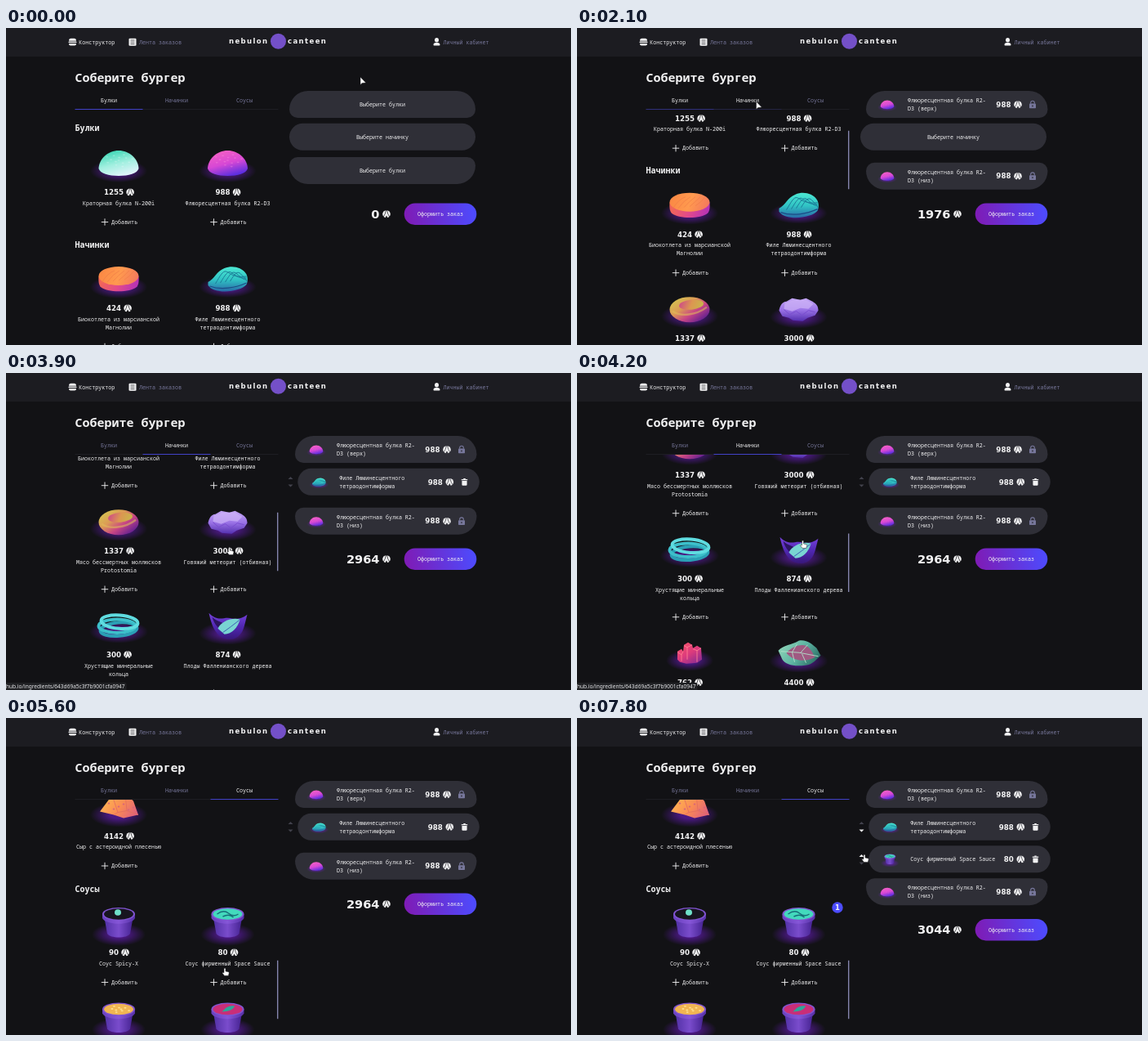
Write an HTML page with a canvas that moves like this. It is 692 px wide and 388 px high and loops after 8000 ms.

```html
<!DOCTYPE html>
<html lang="ru">
<head>
<meta charset="utf-8">
<title>Соберите бургер</title>
<style>
html, body { margin: 0; width: 100%; height: 100%; overflow: hidden; background: #121215; }
canvas { display: block; width: 692px; height: 388px; }
</style>
</head>
<body>
<canvas id="stage"></canvas>
<script>
const W = 692, H = 388, LOOP = 8000;
const canvas = document.getElementById('stage');
const ctx = canvas.getContext('2d');
const dpr = window.devicePixelRatio || 1;
canvas.width = W * dpr;
canvas.height = H * dpr;

const MONO = '"Noto Sans Mono", monospace';
const DIGITS = '"DejaVu Sans", sans-serif';
const WHITE = '#f2f2f3', MUTED = '#77779b', DIM = '#42424d', PANEL = '#2f2f37', ACCENT = '#4c4cff', BG = '#121215', BAR = '#1c1c21';

// ---------- drawing helpers ----------
function text(str, x, y, { size = 6.67, color = WHITE, align = 'left', font = MONO, weight = 400 } = {}) {
  ctx.font = `${weight} ${size}px ${font}`;
  ctx.fillStyle = color;
  ctx.textAlign = align;
  ctx.textBaseline = 'alphabetic';
  ctx.fillText(str, x, y + size * 0.35);
}
function digits(str, x, y, size = 8.7, align = 'left') {
  text(str, x, y, { size, align, font: DIGITS, weight: 700 });
}
function rect(x, y, w, h, color, radii = 0) {
  ctx.fillStyle = color;
  ctx.beginPath();
  ctx.roundRect(x, y, w, h, radii);
  ctx.fill();
}
function oval(x, y, rx, ry, color, turn = 0) {
  ctx.fillStyle = color;
  ctx.beginPath();
  ctx.ellipse(x, y, rx, ry, turn, 0, Math.PI * 2);
  ctx.fill();
}
function shape(d, fill, stroke, width = 1) {
  const p = new Path2D(d);
  if (fill) { ctx.fillStyle = fill; ctx.fill(p); }
  if (stroke) { ctx.strokeStyle = stroke; ctx.lineWidth = width; ctx.stroke(p); }
}
function fade(x0, y0, x1, y1, ...colors) {
  const g = ctx.createLinearGradient(x0, y0, x1, y1);
  colors.forEach((c, i) => g.addColorStop(i / (colors.length - 1), c));
  return g;
}
function at(x, y, draw, scale = 1) {
  ctx.save();
  ctx.translate(x, y);
  ctx.scale(scale, scale);
  draw();
  ctx.restore();
}
function glow(y, rx, ry) {
  ctx.save();
  ctx.translate(0, y);
  ctx.scale(1, ry / rx);
  const g = ctx.createRadialGradient(0, 0, rx * 0.3, 0, 0, rx);
  g.addColorStop(0, 'rgba(105,28,190,.65)');
  g.addColorStop(1, 'rgba(105,28,190,0)');
  oval(0, 0, rx, rx, g);
  ctx.restore();
}

// ---------- ingredient pictures ----------
function dome(speck, ...colors) {
  glow(10, 35, 14);
  shape('M-24.5 7C-24-5-13-15 0-15S24-5 24.5 7C23 13 12 16 0 16S-23 13-24.5 7Z', fade(-4, -15, 4, 16, ...colors));
  for (let i = 0; i < 14; i++) {
    const a = i * 2.4, r = Math.sqrt(i / 14);
    oval(Math.cos(a) * r * 18, -3 + Math.sin(a) * r * 9, 1.5, 0.8, speck);
  }
}
function cutlet() {
  glow(10, 35, 14);
  shape('M-24.5-3C-25 4-24 8-22 10C-14 17 14 17 22 10C24 8 25 4 24.5-3Z', fade(-20, 0, 20, 12, '#f0645a', '#e24a8c', '#b834b4'));
  oval(0, -3.5, 24.5, 11.5, fade(-20, -10, 20, 6, '#fb8a45', '#ff9a4f', '#f47a5c'));
  for (let i = -2; i < 3; i++) shape(`M${i * 7 - 7} ${3 - i}Q${i * 7} ${-5 + i} ${i * 6 + 7}-10`, null, '#ef7d48', 0.7);
}
function fillet() {
  glow(10, 35, 13);
  shape('M-24 4C-16 0-14-9-4-13C6-17 17-14 22-7C25-3 25 3 23 7C16 16-16 20-24 8Z', fade(0, -14, 0, 16, '#4be6d2', '#30c3c4', '#2867a6'));
  for (let i = 0; i < 4; i++) {
    const x = i * 6;
    shape(`M${-15 + x} ${6 - i}C${-9 + x} ${-4 - i} ${-6 + x}-10 ${x - 2} ${-9 + i}S${6 + x} ${-1 + i} 23 ${i * 2 - 3}`, null, '#1b7c98', 1);
  }
  shape('M-22 9C-8 14 10 11 23 5', null, '#1c4a86', 1.2);
}
function mollusc() {
  glow(9, 35, 15);
  oval(0, 1, 24.5, 15.5, fade(-12, -14, 10, 16, '#d6bd52', '#dc9a55', '#c84585', '#70258f'));
  oval(2, -5, 15, 6, fade(-12, -8, 14, 2, '#cf4c86', '#dc9651', '#c8b54b'), -0.1);
  shape('M-21 3C-11 10 8 8 21-2', null, 'rgba(226,190,90,.55)', 2.4);
}
function meteor() {
  glow(10, 35, 14);
  shape('M-24 2C-23-4-20-9-15-9L-8-13 2-11 9-13 17-9C22-6 24-3 24 2L20 8 11 11 5 15-7 14-12 11-20 9Z', fade(0, -13, 0, 16, '#c3a6f4', '#9a72e6', '#4f2cac'));
  shape('M-17-7L-7-11 9-11 18-6 12 0 2-1-8 3-18 0Z', 'rgba(205,178,248,.7)');
  shape('M-18 1L-11 7-3 3 4 8 12 2 20 4', null, '#7a4dd0', 1);
}
function rings() {
  glow(8, 36, 14);
  [[0, 5, '#2a9fb5'], [-2, 1, '#3cbfca'], [1, -4, '#5fdce0']].forEach(([x, y, color], i) => {
    ctx.strokeStyle = color;
    ctx.lineWidth = 4;
    ctx.beginPath();
    ctx.ellipse(x, y, 22.5, 8.2, (i - 1) * 0.08, 0, Math.PI * 2);
    ctx.stroke();
  });
}
function fruit() {
  glow(10, 35, 14);
  shape('M-23-15C-13-5-7-9 0-9C8-8 15-6 24-13C20 1 20 13 6 17C-12 19-19 4-23-15Z', fade(0, -15, 0, 17, '#7843dd', '#5228b4', '#38187c'));
  shape('M-19-10C-12-3-3-5 3 6C-10 8-16 0-19-10Z', '#2c1560');
  shape('M-12 4C-8-5 6-10 15-7C13 2 5 11-4 11Z', '#79d5d2');
  shape('M-6 9Q4 2 14-6', null, '#4060b4', 1);
}
function crystals() {
  glow(9, 29, 13);
  shape('M-15 8L-15-2-10-5-8-2-7-10-2-13 3-10 4-6 9-9 14-6 15 8 9 12-4 13-12 11Z', fade(-8, -13, 8, 13, '#f4506c', '#dd3b7c', '#8f2d91'));
  shape('M-7-9L-3-7 3-10M-3-7V8M-15-1L-10 2-8-2M-10 2V10M4-5L9-3 14-6M9-3V11', null, '#ff7d92', 0.9);
}
function salad() {
  glow(10, 36, 14);
  shape('M-25-3C-19-10-8-10 0-15C10-17 17-10 22-6L27 3C21 8 18 14 8 15C-6 17-16 14-20 8Z', fade(-16, -12, 18, 14, '#86cfb4', '#5cb3a2', '#2f7268'));
  shape('M-15 0C-8-8 2-11 9-9C16-5 17 1 20 5C10 11-6 11-15 0Z', '#a05a82');
  shape('M-22-2Q0-2 24 4M-8-1L-2-11M2 0L11-10M-8-1L-5 11M4 1L9 12', null, '#b3e3cb', 0.9);
}
function cheese() {
  glow(10, 35, 15);
  shape('M-23 6L-8-14 8-16 18-7 24 10 6 14-6 10Z', fade(-15, -10, 18, 14, '#ffb151', '#f98b55', '#e0607c'));
  shape('M-8-14L-1 7-6 10M8-16L10 5 24 10M-1 7L10 5', null, '#e26f60', 0.9);
  for (let i = 0; i < 6; i++) oval(-12 + i * 6, (i * 7) % 10 - 4, 1.3, 0.9, '#d8667a');
}
function cup(sauce, spot) {
  glow(14, 33, 14);
  shape('M-18-9L-14 13C-10 19 10 19 14 13L18-9Z', fade(-18, 0, 18, 0, '#5130a5', '#7a4ccc', '#43218f'));
  shape('M-20-11V-6C-16 3 16 3 20-6V-11Z', fade(-20, 0, 20, 0, '#6840bd', '#8656d8', '#5530a6'));
  oval(0, -11, 20, 8, '#8054d0');
  oval(0, -11, 18, 6.7, sauce);
  spot();
}
const grains = (color) => () => {
  for (let i = 0; i < 9; i++) oval(Math.cos(i * 2.4) * (3 + i * 1.3), -11 + Math.sin(i * 2.4) * (1 + i * 0.45), 1.5, 0.9, color);
};
const blackCup = () => cup('#17151f', () => oval(-1, -13, 4, 3.8, '#6fe0c8'));
const tealCup = () => cup('#43d9bd', () => shape('M-13-11Q-5-17 1-12T13-11M-6-8Q2-12 7-7', null, '#176d79', 1.4));
const yellowCup = () => cup('#f0b552', grains('#ffe08a'));
const redCup = () => cup('#c92e78', () => shape('M-7-8Q0-17 9-15Q5-8-7-8Z', '#2fa59a'));
const crater = () => dome('rgba(255,255,255,.25)', '#43d9b8', '#a0efdf', '#e0f4fa');
const neon = () => dome('rgba(255,150,225,.35)', '#f25ec6', '#d748d5', '#5a2ee0');

// ---------- menu: [price centre y, button offset, items...] ----------
const heads = [['Булки', 122.5], ['Начинки', 265], ['Соусы', 915.5]];
const rows = [
  [201, 36.5, [1255, crater, 'Краторная булка N-200i'], [988, neon, 'Флюоресцентная булка R2-D3']],
  [343, 47, [424, cutlet, 'Биокотлета из марсианской|Магнолии'], [988, fillet, 'Филе Люминесцентного|тетраодонтимформа']],
  [470, 47, [1337, mollusc, 'Мясо бессмертных моллюсков|Protostomia'], [3000, meteor, 'Говяжий метеорит (отбивная)']],
  [597, 47, [300, rings, 'Хрустящие минеральные|кольца'], [874, fruit, 'Плоды Фалленианского дерева']],
  [724, 47, [762, crystals, 'Кристаллы марсианских|альфа-сахаридов'], [4400, salad, 'Мини-салат Экзо-Плантаго']],
  [851, 36.5, [4142, cheese, 'Сыр с астероидной плесенью']],
  [993.5, 36.5, [90, blackCup, 'Соус Spicy-X'], [80, tealCup, 'Соус фирменный Space Sauce']],
  [1110, 47, [15, yellowCup, 'Соус традиционный|галактический'], [88, redCup, 'Соус с шипами']],
];

// ---------- timing ----------
const ADD_BUN = 1100, ADD_FILLET = 3400, ADD_SAUCE = 6400;
const scrollKeys = [[1950, 0], [2100, 90], [2300, 159], [3600, 159], [4200, 345], [4500, 428], [4800, 428], [5500, 706.5]];
const mouseKeys = [
  [100, 434, 60], [900, 285, 233], [1300, 285, 233], [1850, 219.5, 90], [2200, 219.5, 90],
  [3000, 268, 230], [3500, 268, 230], [4150, 276.5, 205], [4800, 276.5, 205], [5550, 268, 306],
  [5700, 268, 306], [6150, 269, 320], [6500, 269, 320], [7200, 362, 173], [7300, 362, 173], [7750, 352, 167],
];
const clamp = (v) => Math.min(1, Math.max(0, v));
const smooth = (u) => u * u * (3 - 2 * u);
function track(keys, t, ease = (u) => u) {
  const i = keys.findIndex((k) => k[0] > t);
  if (i === 0) return keys[0].slice(1);
  if (i < 0) return keys[keys.length - 1].slice(1);
  const a = keys[i - 1], b = keys[i], u = ease((t - a[0]) / (b[0] - a[0]));
  return a.slice(1).map((v, n) => v + (b[n + 1] - v) * u);
}

// ---------- small icons ----------
function coin(x, y, back = BG) {
  at(x, y, () => {
    oval(0, 0, 4.8, 4.5, WHITE);
    shape('M-.6-4.8Q-1.4 0-3.6 3.2M.6-4.8Q1.4 0 3.6 3.2', null, back, 0.7);
    shape('M0 1.6L1.8 5H-1.8Z', back);
  });
}
function plus(x, y) {
  at(x, y, () => shape('M-4.2 0H4.2M0-4.2V4.2', null, WHITE, 0.9));
}
function lock(x, y) {
  at(x, y, () => {
    rect(-4, -1.2, 8, 5.8, MUTED, 0.8);
    shape('M-2.3-1V-2.4C-2.3-5.2 2.3-5.2 2.3-2.4V-1', null, MUTED, 1.1);
    oval(0, 1.7, 0.9, 0.9, PANEL);
  });
}
function trash(x, y) {
  at(x, y, () => {
    rect(-3.8, -3.5, 7.6, 1.3, WHITE, 0.4);
    rect(-1.4, -4.4, 2.8, 1.2, WHITE, 0.4);
    shape('M-3.1-1.6H3.1V3.2Q3.1 4.3 2 4.3H-2Q-3.1 4.3-3.1 3.2Z', WHITE);
  });
}
function arrows(y, up, down) {
  at(348.5, y, () => {
    shape('M-3-3L0-6 3-3Z', up ? WHITE : DIM);
    shape('M-3 3.5L0 6.5 3 3.5Z', down ? WHITE : DIM);
  });
}

// ---------- page parts ----------
function header() {
  rect(0, 0, W, 35, BAR);
  rect(77, 12.8, 9, 3, WHITE, [3, 3, 0.5, 0.5]);
  rect(76.5, 16.6, 10, 1.5, WHITE, 0.7);
  rect(77, 18.9, 9, 2.6, WHITE, [0.5, 0.5, 2, 2]);
  text('Конструктор', 89.3, 17.3);
  rect(150.5, 12.7, 9, 9, WHITE, 1);
  for (let i = 0; i < 3; i++) rect(152.5, 14.6 + i * 2.2, 5, 0.7, BAR);
  text('Лента заказов', 163, 17.3, { color: MUTED });
  const brand = { size: 8.5, font: DIGITS, weight: 700 };
  ctx.letterSpacing = '1.4px';
  text('nebulon', 273, 16.3, brand);
  text('canteen', 345, 16.3, brand);
  ctx.letterSpacing = '0px';
  oval(333.5, 16.3, 9.5, 9.5, '#7450c8');
  oval(527.5, 14.8, 2.5, 2.7, WHITE);
  rect(523.5, 18, 8, 3.6, WHITE, [3, 3, 0.8, 0.8]);
  text('Личный кабинет', 535.5, 17.3, { color: MUTED });
}

function tabs(t) {
  const next = clamp((t - 2000) / 300), last = clamp((t - 5300) / 200);
  const active = t < 2150 ? 0 : t < 5300 ? 1 : 2;
  const strength = [(1 - next) ** 1.5, next ** 1.5 * (1 - last), last];
  const hover = t > 1800 && t < 2500 ? 1 : -1;
  rect(84.5, 99.3, 249, 0.8, '#222229');
  ['Булки', 'Начинки', 'Соусы'].forEach((name, i) => {
    text(name, 126 + i * 83, 88.7, { align: 'center', color: i === active || i === hover ? WHITE : MUTED });
    ctx.globalAlpha = strength[i];
    rect(84.5 + i * 83, 99.2, 83, 0.9, ACCENT);
    ctx.globalAlpha = 1;
  });
}

function badge(count, y) {
  oval(319, y, 6.7, 6.7, ACCENT);
  digits(String(count), 319, y, 8.5, 'center');
}

function card([price, picture, name], x, y, button) {
  at(x, y - 36, picture);
  const label = String(price), width = label.length * 6.05, left = x + 0.5 - (width + 13) / 2;
  digits(label, left, y);
  coin(left + width + 8, y);
  name.split('|').forEach((line, i) => text(line, x, y + 13.5 + i * 10, { align: 'center' }));
  plus(x - 17, y + button);
  text('Добавить', x - 9, y + button);
}

function menu(t) {
  const [scroll] = track(scrollKeys, t);
  ctx.save();
  ctx.beginPath();
  ctx.rect(70, 100, 270, 288);
  ctx.clip();
  for (const [name, y] of heads) text(name, 84.5, y - scroll, { size: 10, weight: 600 });
  for (const [base, button, ...items] of rows) {
    const y = base - scroll;
    if (y < 20 || y > 460) continue;
    items.forEach((item, i) => card(item, 138 + i * 133.5, y, button));
  }
  if (t >= ADD_BUN) badge(2, 146 - scroll);
  if (t >= ADD_FILLET) badge(1, 288 - scroll);
  if (t >= ADD_SAUCE) badge(1, 938.5 - scroll);
  ctx.restore();
  if (t > 800) rect(332, 100.7 + scroll * 0.2776, 1.4, 71.5, '#8585ad');
}

function layer(x, y, picture, lines, price, radii) {
  rect(x, y, 222.5, 33, PANEL, radii);
  const mid = y + 16.7;
  at(x + 26, mid, picture, 0.34);
  lines.forEach((line, i) => text(line, x + 51, mid + (i - (lines.length - 1) / 2) * 10));
  digits(price, x + 177.5, mid, 8.7, 'right');
  coin(x + 186, mid, PANEL);
  return mid;
}
function bun(y, part, radii) {
  lock(558, layer(354, y, neon, ['Флюоресцентная булка R2-', `D3 (${part})`], '988', radii));
}
function filling(y, ...args) {
  trash(561.5, layer(357.3, y, ...args, 16.5));
}
function emptySlot(y, label, radii) {
  rect(347, y, 228, 33, PANEL, radii);
  text(label, 461, y + 16.7, { align: 'center' });
}

function order(t) {
  const hasBun = t >= ADD_BUN, hasFillet = t >= ADD_FILLET, hasSauce = t >= ADD_SAUCE;
  const topRadii = [22.7, 22.7, 10.3, 10.3], lowRadii = [10.3, 10.3, 22.7, 22.7];
  const shift = hasSauce ? 31.5 : 0;
  if (hasBun) {
    bun(77, 'верх', topRadii);
    bun(164.7 + shift, 'низ', lowRadii);
  } else {
    emptySlot(77, 'Выберите булки', topRadii);
    emptySlot(158, 'Выберите булки', lowRadii);
  }
  if (hasFillet) {
    filling(116.8, fillet, ['Филе Люминесцентного', 'тетраодонтимформа'], '988');
    arrows(133, false, hasSauce);
  } else {
    emptySlot(116.8, 'Выберите начинку', 16.5);
  }
  if (hasSauce) {
    filling(156.3, tealCup, ['Соус фирменный Space Sauce'], '80');
    arrows(173, true, false);
  }
  const total = hasSauce ? '3044' : hasFillet ? '2964' : hasBun ? '1976' : '0';
  const y = 227.8 + shift;
  digits(total, 457.5, y, 14.6, 'right');
  coin(466, y);
  rect(487.7, y - 13.2, 88.6, 26.3, fade(487, y + 8, 576, y - 8, '#801ab3', ACCENT), 13.2);
  text('Оформить заказ', 532, y, { align: 'center' });
}

function status(t) {
  if (t < 3900 || t >= 4850) return;
  rect(0, 379, 147.5, 9, '#202124', [0, 2, 0, 0]);
  text('hub.io/ingredients/643d69a5c3f7b9001cfa0947', 0, 383.6, { size: 6.55, color: '#e4e5e8', font: '"Noto Sans", sans-serif' });
}

function pointer(t) {
  const [x, y] = track(mouseKeys, t, smooth);
  const hand = (x < 334 && y > 101) || t > 7400;
  const outline = hand
    ? 'M-1 .8Q0-.6 1 .8V4L4.4 4.7Q5.4 5 5.2 6.2L4.4 9.4H-.5L-3 6.3Q-3.2 5-1 5.8Z'
    : 'M0 0V9.4L2.2 7.5 6.8 7Z';
  ctx.lineJoin = 'round';
  at(x, y, () => shape(outline, '#fff', '#18181c', 0.5));
}

function draw(t) {
  ctx.setTransform(dpr, 0, 0, dpr, 0, 0);
  rect(0, 0, W, H, BG);
  header();
  text('Соберите бургер', 84.5, 60.3, { size: 15, weight: 600 });
  tabs(t);
  menu(t);
  order(t);
  status(t);
  pointer(t);
}

const start = performance.now();
function frame() {
  draw((performance.now() - start) % LOOP);
  requestAnimationFrame(frame);
}
frame();
</script>
</body>
</html>
```
